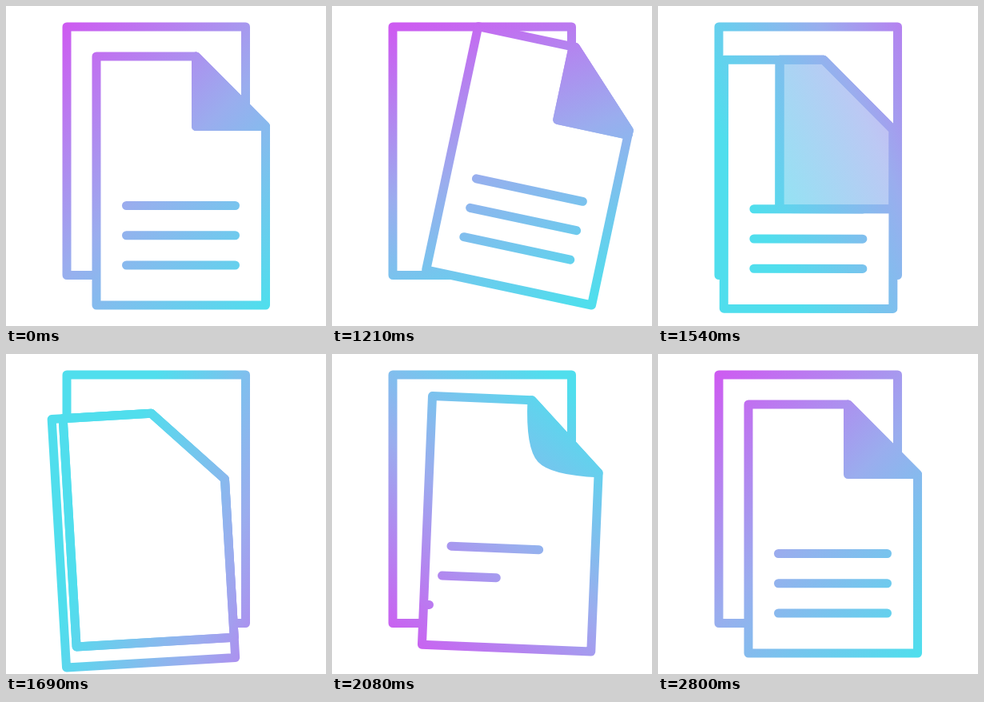
Write an HTML page with a canvas that moves like this. It is 400 by 400 pixels and loops after 2830 ms.

```html
<!DOCTYPE html>
<html lang="en">
<head>
<meta charset="utf-8">
<title>Documents</title>
<style>
  html, body { margin: 0; width: 100%; height: 100%; overflow: hidden; background: #fff; }
  canvas { display: block; width: 400px; height: 400px; }
</style>
</head>
<body>
<canvas id="stage"></canvas>
<script>
const LOOP = 2830, HOLD = 1030, STEP = 30, MOVE = LOOP - HOLD;
const canvas = document.getElementById('stage');
const ctx = canvas.getContext('2d');
const ratio = window.devicePixelRatio || 1;
canvas.width = canvas.height = 400 * ratio;

// Page geometry at rest
const L = 113, T = 63, R = 324.5, B = 374, CUT_X = 237.5, CUT_Y = 150.5;
const ROW_Y = 249.5, ROW_GAP = 37.25;
const TURNED = 690; // the old sheet is fully turned

const clamp = v => Math.min(1, Math.max(0, v));
const mix = (a, b, k) => a + (b - a) * k;
const smooth = v => (1 - Math.cos(Math.PI * clamp(v))) / 2;
const easeOut = v => 1 - Math.pow(1 - clamp(v), 2.4);
// Rises to 1 at the peak and falls back to 0 at either side
const bump = (t, peak, width) => smooth(1 - Math.abs(t - peak) / width);

// The page sways right, left, right and comes to rest: time, degrees
const SWAY = [[-30, 0], [200, 12.3], [650, -3.4], [1260, 4.5], [1600, 0]];

function tilt(t) {
  return SWAY.slice(1).reduce((angle, [end, next], i) =>
    mix(angle, next, smooth((t - SWAY[i][0]) / (end - SWAY[i][0]))), 0);
}

function pagePose(t) {
  const pull = bump(t, 640, 450), lift = bump(t, 1050, 250), settle = bump(t, 1350, 250);
  return new DOMMatrix()
    .translate(R - 38 * pull - 2 * settle, B + 5.5 * pull - 2 * lift + 1.5 * settle)
    .rotate(tilt(t))
    .translate(-R, -B);
}

// One full turn, drifting off centre and tightening midway
function gradient(t) {
  const turn = smooth(Math.pow(clamp(t / MOVE), .78));
  const a = (turn * 360 - 135) * Math.PI / 180;
  const shift = 93 * bump(t, 650, 520);
  const reach = 212 - 45 * bump(t, 660, 700);
  const at = d => [200 + Math.cos(a) * d, 200 + Math.sin(a) * d];
  const g = ctx.createLinearGradient(...at(shift + reach), ...at(shift - reach));
  g.addColorStop(0, '#cd5cf1');
  g.addColorStop(.5, '#9aadee');
  g.addColorStop(1, '#50deed');
  return g;
}

function polygon(...points) {
  const p = new Path2D();
  points.forEach(([x, y]) => p.lineTo(x, y));
  p.closePath();
  return p;
}

function placed(path, pose) {
  const p = new Path2D();
  p.addPath(path, pose);
  return p;
}

function shape(path, fill) {
  ctx.fillStyle = fill;
  ctx.fill(path);
  ctx.stroke(path);
}

const back = polygon([76, 26], [299.5, 26], [299.5, 336.5], [76, 336.5]);
const page = polygon([L, T], [CUT_X, T], [R, CUT_Y], [R, B], [L, B]);

// The folded corner spreads until it covers the page
function oldFlap(t) {
  const k = Math.pow(clamp(t / TURNED), 2.7);
  const x = mix(CUT_X, L, k), y = mix(CUT_Y, B, k);
  return polygon([CUT_X, T], [x, T], [x, y], [R, y], [R, CUT_Y]);
}

// The new corner bulges out of the diagonal until it is square
function newFlap(t) {
  const k = easeOut((t - 780) / 740);
  const p = new Path2D();
  p.moveTo(CUT_X, T);
  p.quadraticCurveTo(CUT_X, mix(T, CUT_Y, k),
    mix((CUT_X + R) / 2, CUT_X, k), mix((T + CUT_Y) / 2, CUT_Y, k));
  p.quadraticCurveTo(mix(R, CUT_X, k), CUT_Y, R, CUT_Y);
  p.closePath();
  return p;
}

function drawRows(t, pose) {
  for (let i = 0; i < 3; i++) {
    const k = t < TURNED ? 1 : easeOut((t - 772 - 138 * i) / 560);
    if (k <= 0) continue;
    const y = ROW_Y + ROW_GAP * i, row = new Path2D();
    row.moveTo(118.5 + 32 * k, y);
    row.lineTo(118.5 + 168 * k, y);
    ctx.stroke(placed(row, pose));
  }
}

function draw(t) {
  const pose = pagePose(t), paint = gradient(t);

  ctx.setTransform(ratio, 0, 0, ratio, 0, 0);
  ctx.fillStyle = '#fff';
  ctx.fillRect(0, 0, 400, 400);
  ctx.lineWidth = 11;
  ctx.lineJoin = ctx.lineCap = 'round';
  ctx.strokeStyle = paint;

  shape(back, '#fff');
  shape(placed(page, pose), '#fff');
  drawRows(t, pose);

  if (t < TURNED) {
    const flap = placed(oldFlap(t), pose);
    shape(flap, '#fff');
    ctx.globalAlpha = 1 - clamp((t - 450) / 180);
    ctx.fillStyle = paint;
    ctx.fill(flap);
    ctx.globalAlpha = 1;
    ctx.stroke(flap);
  } else {
    shape(placed(newFlap(t), pose), paint);
  }
}

const start = performance.now();
function tick() {
  const t = (performance.now() - start) % LOOP - HOLD;
  draw(t < 0 ? -HOLD : Math.floor(t / STEP) * STEP);
  requestAnimationFrame(tick);
}
tick();
</script>
</body>
</html>
```
